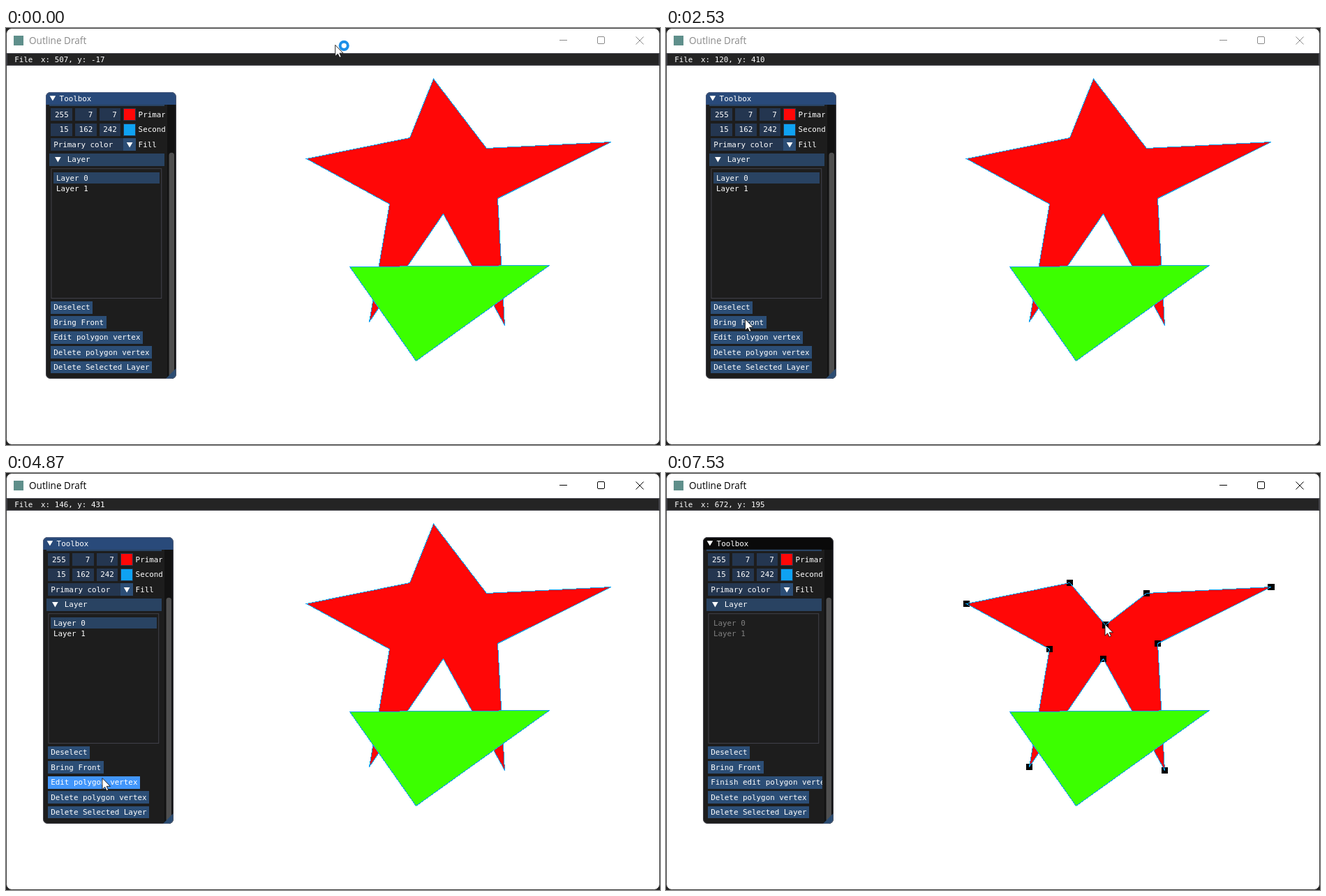
Recreate the animation shown at these times as an HTML page. Size 937 by 598 pixels, loop 8000 ms.

```html
<!DOCTYPE html>
<html lang="en">
<head>
<meta charset="utf-8">
<title>Outline Draft</title>
<style>
  html, body { margin: 0; width: 100%; height: 100%; overflow: hidden; background: #222; }
  svg { display: block; }
  text { white-space: pre; }
  .mono { font: 11.63px "DejaVu Sans Mono", monospace; fill: #fff; }
  .caption { font: 13.6px "Open Sans", sans-serif; }
  .crisp { shape-rendering: crispEdges; }
</style>
</head>
<body>
<script>
const LOOP = 8000, STEP = 1000 / 15;
const BLUE = '#0fa2f2', RED = '#ff0707', BUTTON = '#2c4e76', HEADER = '#294362', FRAME = '#243650';
const EDGE = { fill: 'none', stroke: '#6e6e80', 'stroke-opacity': 0.5 };

// The app's interface is laid out in its own units and shown slightly smaller.
const SCALE = 0.934, ROW = 19, GAP = 4, PAD = 8, PANEL_W = 200, PANEL_H = 440;

// Steps at which the state changes.
const FOCUS = 41, PRESS = 78, EDIT = 80, DRAG = 97, REFILL = 113;

const star = [[612, 72.5], [688, 172], [866.5, 163], [704, 244], [714, 426],
              [626, 266], [520, 421], [549, 252], [430, 187], [578, 157]];

// Pointer moves: first step, last step, destination
const home = [475, 19];
const moves = [
  [-0.4, 5.5, 226, 427],
  [8.1, 17.5, 152.5, 312],
  [22.4, 37, 113.4, 417.5],
  [FOCUS, 44, 109.7, 417.5],
  [47.1, 50.8, 211, 402],
  [50.8, 54.5, 122.5, 420.5],
  [61.6, 62.6, 134, 458],
  [66.1, 72, 138, 437.5],
  [82.1, 84.5, 633, 119],
  [87.1, 91, 620, 80.2],
  [92.1, 94.5, 612, 72.5],
  [96.1, 103.5, 633, 198],
  [105.2, 109.5, 629, 217]
];

function ease(n, from, to) {
  const p = Math.min(1, Math.max(0, (n - from) / (to - from)));
  return p * p * (3 - 2 * p);
}

function pointerAt(n) {
  return moves.reduce(([x, y], [from, to, tx, ty]) => {
    const e = ease(n, from, to);
    return [x + (tx - x) * e, y + (ty - y) * e];
  }, home);
}

function el(tag, attrs, parent, content) {
  const e = document.createElementNS('http://www.w3.org/2000/svg', tag);
  for (const k in attrs) e.setAttribute(k, attrs[k]);
  if (content !== undefined) e.textContent = content;
  if (parent) parent.appendChild(e);
  return e;
}
const set = (e, attrs) => { for (const k in attrs) e.setAttribute(k, attrs[k]); };
const show = (e, on) => set(e, { visibility: on ? 'visible' : 'hidden' });
const box = (p, x, y, width, height, fill) =>
  el('rect', { x, y, width, height, fill, class: 'crisp' }, p);
// y is the top of the text line
const mono = (p, x, y, s, more) => el('text', { x, y: y + 10.5, class: 'mono', ...more }, p, s);
const arrow = (p, x, y) => el('path', { d: `M${x} ${y}h9.2l-4.6 8z`, fill: '#fff' }, p);
const clip = (id, attrs) => el('rect', attrs, el('clipPath', { id }, defs));

const svg = el('svg', { width: 937, height: 598, viewBox: '0 0 937 598' }, document.body);
const defs = el('defs', {}, svg);
const windowShape = { x: 0.5, y: 0.5, width: 936, height: 597, rx: 8 };
clip('window', windowShape);
clip('panel', { width: PANEL_W, height: PANEL_H, rx: 7 });
clip('content', { y: ROW, width: 183, height: PANEL_H });

// Window
const win = el('g', { 'clip-path': 'url(#window)' }, svg);
box(win, 0, 0, 937, 598, '#fff');
box(win, 11, 11, 14, 14, '#5f8f8b');
const caption = el('text', { x: 33, y: 23, class: 'caption' }, win, 'Outline Draft');
const controls = el('g', { fill: 'none' }, win);
el('path', { d: 'M793 17.5H804M902.5 12.5l11 11M913.5 12.5l-11 11' }, controls);
el('rect', { x: 847.5, y: 12.5, width: 10, height: 10, rx: 1.5 }, controls);

const menu = el('g', { transform: `translate(1 36) scale(${SCALE})` }, win);
box(menu, 0, 0, 1001, ROW, '#242424');
el('rect', { x: 0.5, y: 0.5, width: 1000, height: ROW - 1, ...EDGE }, menu);
mono(menu, 12, 3, 'File');
const readout = mono(menu, 52.5, 3, '');

// Drawing; coordinates name pixels, so shift to their centres
const art = el('g', { class: 'crisp', transform: 'translate(.5 .5)' }, win);
const fill = el('polygon', { fill: RED }, art);
const handles = el('g', {}, art);
const dots = star.map(([x, y]) => box(handles, x - 4.7, y - 4.7, 9.4, 9.4, '#000'));
const outline = el('polygon', { fill: 'none', stroke: BLUE }, art);
el('polygon', { points: '492,342 778,340 587,477', fill: '#3cff00', stroke: BLUE }, art);

// Toolbox
const panel = el('g', {}, win);
const body = el('g', { 'clip-path': 'url(#panel)' }, panel);
box(body, 0, 0, PANEL_W, PANEL_H, '#1d1d1d');
const bar = box(body, 0, 0, PANEL_W, ROW, '#294a7a');
arrow(body, 6, 5.5);
mono(body, 21, 3, 'Toolbox');
box(body, 186, ROW, 14, PANEL_H, '#121212');
el('rect', { x: 189, y: 93, width: 8, height: 344, rx: 4, fill: '#4f4f4f' }, body);
el('path', { d: `M${PANEL_W} ${PANEL_H}v-16l-16 16z`, fill: '#2b4c72' }, body);
el('rect', { x: 0.5, y: 0.5, width: PANEL_W - 1, height: PANEL_H - 1, rx: 7, ...EDGE }, panel);

const content = el('g', { 'clip-path': 'url(#content)' }, body);
const pitch = ROW + GAP, rowY = i => 25 + i * pitch, swatchX = 119, labelX = 142;

function colorRow(y, values, color, label) {
  values.forEach((v, i) => {
    const x = PAD + i * 37;
    box(content, x, y, 33, ROW, FRAME);
    mono(content, x + 27, y + 3, v, { 'text-anchor': 'end' });
  });
  box(content, swatchX, y, ROW, ROW, FRAME);
  box(content, swatchX + 1, y + 1, ROW - 2, ROW - 2, color);
  mono(content, labelX, y + 3, label);
}
const headerBox = y => box(content, 5, y, 177, ROW, HEADER);

headerBox(rowY(-1));
colorRow(rowY(0), [255, 7, 7], RED, 'Primary color');
colorRow(rowY(1), [15, 162, 242], BLUE, 'Secondary color');

const comboY = rowY(2);
box(content, PAD, comboY, swatchX - PAD, ROW, FRAME);
box(content, swatchX, comboY, ROW, ROW, BUTTON);
mono(content, PAD + 4, comboY + 3, 'Primary color');
arrow(content, swatchX + 5, comboY + 6);
mono(content, labelX, comboY + 3, 'Fill');

const headerY = rowY(3);
headerBox(headerY);
arrow(content, 14, headerY + 5.5);
mono(content, 33, headerY + 3, 'Layer');

const listY = rowY(4);
el('rect', { x: PAD + 0.5, y: listY + 0.5, width: 169, height: 199, ...EDGE }, content);
const picked = box(content, 12, listY + 6, 162, 17, HEADER);
const layers = [0, 1].map(i => mono(content, 16, listY + 8 + i * 17, 'Layer ' + i));

const buttons = ['Deselect', 'Bring Front', 'Edit polygon vertex',
                 'Delete polygon vertex', 'Delete Selected Layer'].map((name, i) => {
  const y = listY + 200 + GAP + i * pitch;
  const back = box(content, PAD, y, 0, ROW, BUTTON);
  return { name, y, back, label: mono(content, PAD + 4, y + 3, '') };
});

// Pointer
const pointer = el('g', {}, win);
const busy = el('circle', { cx: 12.5, cy: 1, r: 5.6, fill: '#fff', stroke: '#1c8fe8',
                            'stroke-width': 4 }, pointer);
el('path', { d: 'M0 0V16.2L3.7 12.8L6.2 18L8.6 17L6.2 11.8H11.4Z', fill: '#fff',
             stroke: '#111', 'stroke-width': 0.9 }, pointer);

el('rect', { ...windowShape, fill: 'none', stroke: '#3c3c3c' }, svg);

function drawButtons(n, x, y) {
  buttons.forEach((b, i) => {
    const name = i === 2 && n >= EDIT ? 'Finish edit polygon vertex' : b.name;
    const width = name.length * 7 + 8;
    const hot = n >= FOCUS && x >= PAD && x < Math.min(PAD + width, 183) &&
                y >= b.y && y < b.y + ROW;
    const held = hot && n >= PRESS && n < EDIT;
    b.label.textContent = name;
    set(b.back, { width, fill: held ? '#0f87fa' : hot ? '#4296fa' : BUTTON });
  });
}

function draw(ms) {
  const n = Math.floor(ms / STEP + 0.06);
  const [x, y] = pointerAt(n);
  const [sx, sy] = pointerAt(n - 0.4); // the app reads the pointer slightly late
  const active = n >= FOCUS, editing = n >= EDIT, ink = active ? '#000' : '#8a8a8a';

  set(pointer, { transform: `translate(${x} ${y})` });
  show(busy, n < 1);
  readout.textContent =
    `x: ${Math.round((sx - 1.4) / SCALE)}, y: ${Math.round((sy - 34.7) / SCALE)}`;
  set(caption, { fill: ink });
  set(controls, { stroke: ink });

  const left = Math.round(57 - 4 * ease(n, FOCUS, 44));
  set(panel, { transform: `translate(${left} 92) scale(${SCALE})` });
  set(bar, { fill: n >= DRAG ? '#0a0a0a' : '#294a7a' });
  show(picked, !editing);
  layers.forEach(l => { l.style.fill = editing ? '#808080' : '#fff'; });
  drawButtons(n, (sx - left) / SCALE, (sy - 92) / SCALE);

  const tip = n >= DRAG ? [x, y + 0.5] : star[0];
  const shape = [tip, ...star.slice(1)];
  set(outline, { points: shape.join(' ') });
  set(fill, { points: (n >= REFILL ? shape : star).join(' ') });
  set(dots[0], { x: tip[0] - 4.7, y: tip[1] - 4.7 });
  show(handles, editing);
}

const start = performance.now();
function tick() {
  draw((performance.now() - start) % LOOP);
  requestAnimationFrame(tick);
}
tick();
</script>
</body>
</html>
```
